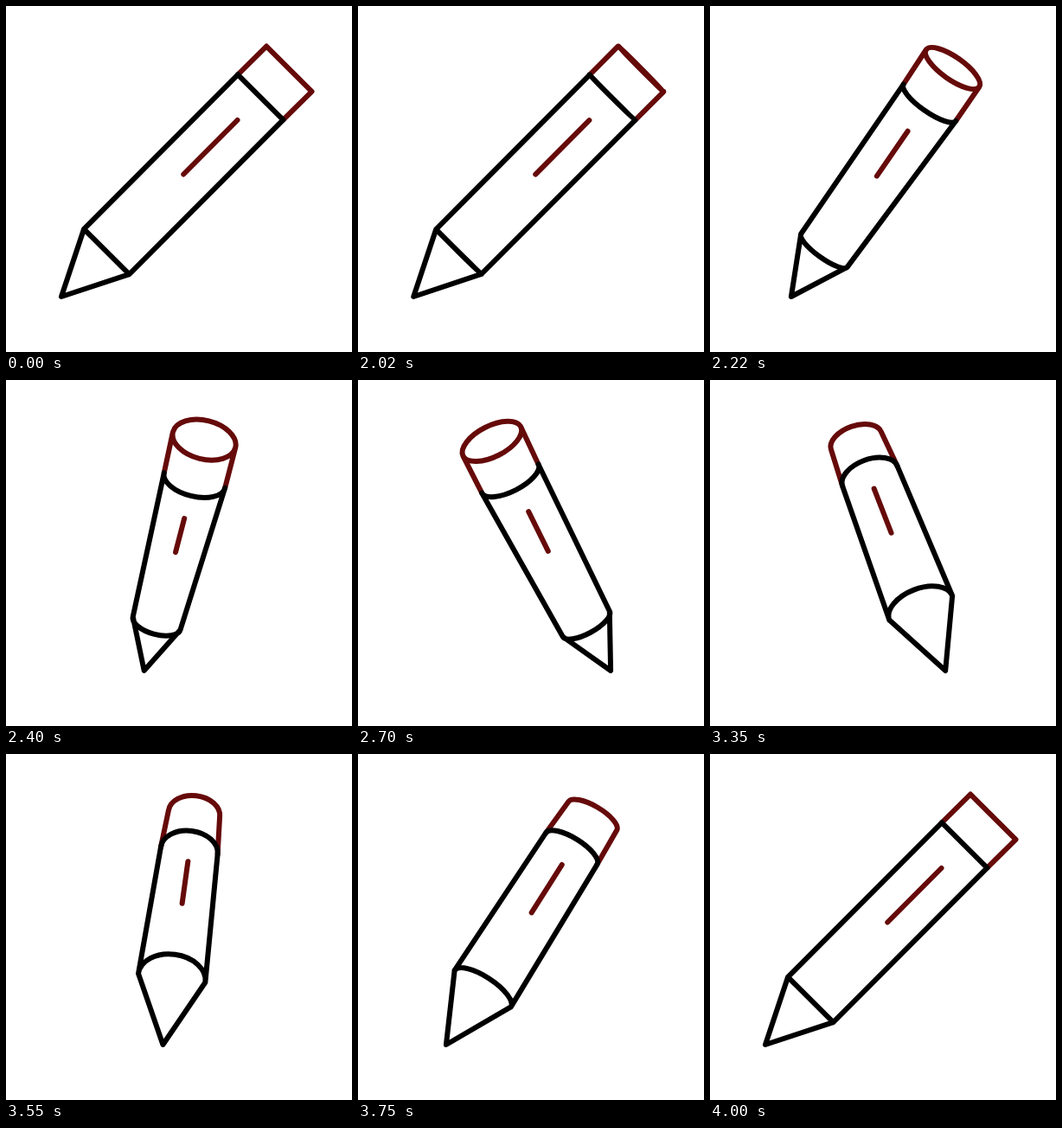
Recreate the animation shown at these times as an HTML page. Size 400 px wide and 400 px high, loop 4020 ms.

```html
<!DOCTYPE html>
<html lang="en">
<head>
<meta charset="utf-8">
<title>Turning pencil</title>
<style>
  html, body { margin: 0; width: 100%; height: 100%; overflow: hidden; background: #fff; }
  svg { display: block; width: 100vw; height: 100vh; }
  path { fill: none; stroke-width: 6; stroke-linecap: round; stroke-linejoin: round; }
  .red { stroke: #660a0a; }
  .black { stroke: #000; }
</style>
</head>
<body>
<svg viewBox="0 0 400 400">
  <path id="cap" class="red"/>
  <path id="mark" class="red"/>
  <path id="body" class="black"/>
</svg>
<script>
const LOOP = 4020, REST = 2000, HALF = 1000;
const AXIS = 205.3, RADIUS = 26.2;

// Pairs hold one value for each half turn: top towards the viewer, then away.
// x: flat offset from the axis, swing: sideways bend, lift: vertical bend,
// wide: extra half width, skew: change of slant, round: openness of the ellipse
const RIMS = {
  cap:    { x: 122,  y: 72.75, power: 4,   swing: [-26.8, -26.8], lift: [-4.4, -4],
            wide: [11, 3.5],    skew: [.065, -.2],  round: [.65, .72] },
  collar: { x: 88.9, y: 105.5, power: 1.3, swing: [-27.6, -27],   lift: [11.3, 6.3],
            wide: [9.9, 6.8],   skew: [.04, -.06],  round: [.54, .72] },
  base:   { x: -89,  y: 284,   power: 2,   swing: [-4.1, 4.6],    lift: [-3.2, -25.7],
            wide: [1.35, 12.8], skew: [-.11, .15],  round: [.49, .72] }
};
const TIP  = { x: -141.3, y: 336, power: 2, swing: [0, 0], lift: [0, 0] };
const LOW  = { x: 0,    y: 194.5, power: 2, swing: [-15.9, -5.3], lift: [5.1, -22.3] };
const HIGH = { x: 62.2, y: 132,   power: 2, swing: [-33, -17.3],  lift: [31, -8] };

// cubic-bezier(.4, 0, .6, 1)
function ease(t) {
  let lo = 0, hi = 1;
  for (let i = 0; i < 24; i++) {
    const s = (lo + hi) / 2, r = 1 - s;
    if (1.2 * s * r * r + 1.8 * s * s * r + s * s * s < t) lo = s; else hi = s;
  }
  return lo * lo * (3 - 2 * lo);
}

function poseAt(ms) {
  const turn = Math.min(Math.max((ms - REST) / HALF, 0), 2);
  const half = turn > 0 && turn < 1 ? 0 : turn < 2 && turn >= 1 ? 1 : 0;
  const t = turn === 2 ? 0 : turn - half;
  return {
    half,
    dir: half ? -1 : 1,
    cos: 1 - 2 * ease(t),
    sin: Math.sin(Math.PI * t),
    bend: Math.sin(2 * Math.PI * t) * (1 - Math.cos(Math.PI * t) ** 6)
  };
}

function place(p, o) {
  return [
    AXIS + o.dir * (p.x * o.cos + p.swing[o.half] * o.bend),
    p.y + p.lift[o.half] * o.sin ** p.power
  ];
}

function rimAt(rim, o) {
  const [x, y] = place(rim, o);
  const dx = RADIUS + rim.wide[o.half] * o.sin ** 2;
  const dy = RADIUS * o.dir * o.cos * (1 + rim.skew[o.half] * o.sin);
  const rx = Math.hypot(dx, dy);
  return {
    left: [x - dx, y - dy],
    right: [x + dx, y + dy],
    rx,
    ry: rx * rim.round[o.half] * o.sin ** (o.half ? 2 : 1.4),
    tilt: Math.atan2(dy, dx) * 180 / Math.PI
  };
}

const pt = p => p[0].toFixed(2) + ' ' + p[1].toFixed(2);
const line = (...points) => 'M' + points.map(pt).join('L');
const arc = (r, up) =>
  `A${r.rx.toFixed(3)} ${r.ry.toFixed(3)} ${r.tilt.toFixed(2)} 0 ${up} ${pt(r.right)}`;
const set = (id, d) => document.getElementById(id).setAttribute('d', d);

function draw(ms) {
  const o = poseAt(ms);
  const cap = rimAt(RIMS.cap, o), collar = rimAt(RIMS.collar, o), base = rimAt(RIMS.base, o);
  const tip = place(TIP, o);
  const front = r => 'M' + pt(r.left) + arc(r, o.half);
  const moving = o.sin > 0;

  set('cap', line(collar.left, cap.left) + arc(cap, 1) + 'L' + pt(collar.right) +
    (moving && !o.half ? front(cap) : ''));
  set('mark', line(place(LOW, o), place(HIGH, o)));
  set('body', line(collar.left, base.left, tip, base.right, collar.right) +
    front(collar) + front(base));
}

const start = performance.now();
function tick() {
  draw((performance.now() - start) % LOOP);
  requestAnimationFrame(tick);
}
tick();
</script>
</body>
</html>
```
